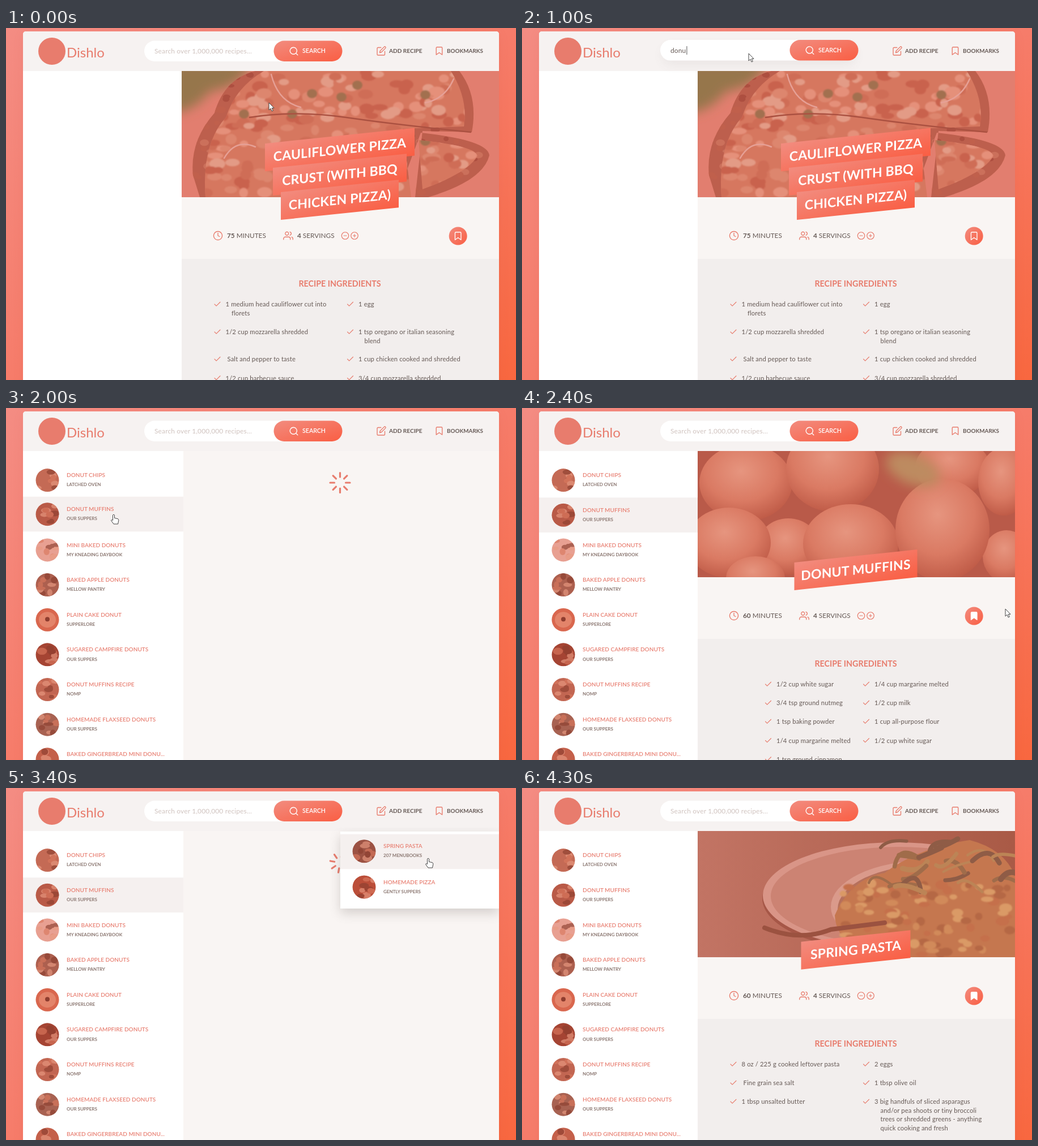
Animation of 900x622 px, one loop 4.6 s. Source, as an HTML page:

```html
<!DOCTYPE html>
<html lang="en">
<head>
<meta charset="utf-8">
<title>Recipe search</title>
<style>
  html, body { margin: 0; width: 100%; height: 100%; overflow: hidden; }
  svg#stage { display: block; width: 100%; height: 100%; font-family: Lato, "Open Sans", sans-serif; }
  text { white-space: pre; }
</style>
</head>
<body>
<svg id="stage" viewBox="0 0 900 622">
  <defs>
    <linearGradient id="page" x1="0" y1="0" x2="1" y2="1">
      <stop stop-color="#f48c83"/><stop offset=".5" stop-color="#f67c6a"/><stop offset="1" stop-color="#f8673f"/>
    </linearGradient>
    <linearGradient id="coral" x1="0" y1="0" x2="1" y2="1">
      <stop stop-color="#f28c7f"/><stop offset="1" stop-color="#fa5e43"/>
    </linearGradient>
    <linearGradient id="wood"><stop stop-color="#c27464"/><stop offset="1" stop-color="#a95a46"/></linearGradient>
    <radialGradient id="ball" cx=".45" cy=".35" r=".65">
      <stop stop-color="#e6957f"/><stop offset=".6" stop-color="#da7a63"/><stop offset="1" stop-color="#c05c48"/>
    </radialGradient>
    <filter id="soft" x="-50%" y="-50%" width="200%" height="200%"><feGaussianBlur stdDeviation="10"/></filter>
    <filter id="slight"><feGaussianBlur stdDeviation="1.2"/></filter>
    <clipPath id="disc"><circle r="20.5"/></clipPath>
  </defs>
</svg>
<script>
const stage = document.getElementById('stage');
const CORAL = '#e87c6d', DARK = '#655955', PALE = '#f9f5f3', GREY = '#f2eeed';

let seed = 7;
const random = (low = 0, high = 1) => {
  seed = (seed * 16807) % 2147483647;
  return low + (high - low) * seed / 2147483647;
};

const rect = (x, y, w, h, fill, extra = '') =>
  `<rect x="${x}" y="${y}" width="${w}" height="${h}" fill="${fill}" ${extra}/>`;
const oval = (x, y, rx, ry, fill, extra = '') =>
  `<ellipse cx="${x}" cy="${y}" rx="${rx}" ry="${ry}" fill="${fill}" ${extra}/>`;
const path = (d, fill, extra = '') => `<path d="${d}" fill="${fill}" ${extra}/>`;
const line = (d, color, width) => path(d, 'none', `stroke="${color}" stroke-width="${width}" stroke-linecap="round"`);
const group = (id, content, extra = '') => `<g id="${id}" ${extra}>${content}</g>`;
// y is the middle of the capitals
const text = (x, y, content, size, fill, extra = '') =>
  `<text x="${x}" y="${y + size * .36}" font-size="${size}" fill="${fill}" ${extra}>${content}</text>`;

const ICONS = {
  search: 'M11 3a8 8 0 1 0 .01 0zM21 21l-4.3-4.3',
  edit: 'M11 4H4a2 2 0 0 0-2 2v14a2 2 0 0 0 2 2h14a2 2 0 0 0 2-2v-7M18.5 2.5a2.1 2.1 0 0 1 3 3L12 15l-4 1 1-4z',
  bookmark: 'M19 21l-7-5-7 5V5a2 2 0 0 1 2-2h10a2 2 0 0 1 2 2z',
  clock: 'M12 2a10 10 0 1 0 .01 0zM12 6v6l4 2',
  users: 'M17 21v-2a4 4 0 0 0-4-4H5a4 4 0 0 0-4 4v2M9 3a4 4 0 1 0 .01 0zM23 21v-2a4 4 0 0 0-3-3.9M16 3.1a4 4 0 0 1 0 7.8',
  minus: 'M12 2a10 10 0 1 0 .01 0zM8 12h8',
  plus: 'M12 2a10 10 0 1 0 .01 0zM8 12h8M12 8v8',
  check: 'M20 6L9 17l-5-5',
};
const icon = (name, x, y, size, color = CORAL, extra = '') =>
  `<path d="${ICONS[name]}" transform="translate(${x - size / 2} ${y - size / 2}) scale(${size / 24})" fill="none"
    stroke="${color}" stroke-width="1.8" stroke-linecap="round" stroke-linejoin="round" ${extra}/>`;

// Photographs
const scatter = (count, [x1, x2], [y1, y2], colors, size) => Array.from({ length: count }, (_, i) =>
  oval(random(x1, x2), random(y1, y2), random(size / 2, size), random(size / 3, size * .7), colors[i % colors.length])).join('');

const CRUST = 'M440 76Q385 90 368 150Q324 200 330 260L342 299H722L735 182L822 184Q834 120 800 76Z' +
  'M732 185Q850 198 853 225Q842 270 745 299H690Z';
const TOPPING = 'M455 76Q405 105 388 158Q345 205 352 299H715L700 178L808 174Q816 125 785 76Z' +
  'M728 198Q828 208 832 226Q815 256 735 285Z';
const CHEESE = ['#e39b86', '#c9624d', '#dd866e', '#cf6d56', '#e5907a'];

const pizza = () =>
  `<clipPath id="crust">${path(CRUST, '#000')}</clipPath><clipPath id="topping">${path(TOPPING, '#000')}</clipPath>` +
  rect(310, 76, 560, 223, '#e27e6f') +
  path('M290 60H435Q415 105 360 112Q330 150 290 150Z', '#96764c', 'filter="url(#soft)"') +
  path(CRUST, '#bd5f4d') +
  `<g clip-path="url(#crust)">${scatter(150, [325, 855], [76, 299], ['#ad4f40', '#cb705b', '#c0604c'], 9)}</g>` +
  path(TOPPING, '#d6775f') +
  `<g clip-path="url(#topping)"><g filter="url(#slight)">${scatter(230, [350, 832], [78, 299], CHEESE, 14)}` +
  [[540, 116], [620, 101], [740, 118], [505, 152], [592, 122], [740, 200], [420, 152]]
    .map(([x, y]) => oval(x, y, 9, 8, '#a27050')).join('') + '</g></g>' +
  line('M430 158Q510 145 600 158T820 184', '#ab5141', 2.5) +
  line('M468 82Q480 130 520 140M790 90Q775 125 740 132M385 230Q405 195 440 210', '#e6a096', 2.5);

const muffins = () =>
  rect(310, 76, 560, 223, '#b95a49') +
  [[760, 105, 66, 50], [850, 130, 45, 60], [470, 245, 55, 50], [395, 132, 82, 68], [365, 238, 74, 62], [548, 108, 82, 75],
   [580, 240, 84, 70], [855, 262, 42, 46], [742, 215, 83, 90], [412, 300, 52, 38]]
    .map(([x, y, rx, ry]) => oval(x, y, rx, ry, 'url(#ball)')).join('') +
  oval(690, 108, 50, 27, '#bd8b60', 'transform="rotate(22 690 108)" filter="url(#soft)"');

const pasta = () =>
  rect(310, 76, 560, 223, 'url(#wood)') +
  oval(660, 195, 236, 96, '#a65747') + oval(660, 190, 235, 94, '#d99587') + oval(665, 191, 226, 87, '#cc8373') +
  oval(715, 210, 170, 82, '#da9a8b') + oval(720, 214, 163, 78, '#b6705c') +
  path('M552 225Q580 160 640 150Q700 105 790 92Q860 110 875 170V300H660Q555 290 552 225Z', '#c5774f') +
  `<g filter="url(#slight)">${scatter(90, [565, 865], [165, 295], ['#da9a66', '#c5704b', '#d18a5a', '#b56845'], 12)}</g>` +
  Array.from({ length: 22 }, (_, i) => {
    const x = random(610, 850), y = random(105, 185);
    return line(`M${x} ${y}q${random(5, 30)} ${random(-40, 10)} ${random(30, 60)} ${random(-25, 20)}`,
      ['#8f5c46', '#bc8456', '#a06c4a'][i % 3], random(4, 10));
  }).join('') +
  line('M428 247Q490 272 545 250L640 238', '#9b5240', 8);

const thumbnail = (x, y, color) =>
  `<g transform="translate(${x} ${y})" clip-path="url(#disc)">${oval(0, 0, 21, 21, color)}` +
  `<g opacity=".65">${scatter(9, [-16, 16], [-16, 16], ['#e99a82', '#8d4031', '#d9785f'], 9)}</g></g>`;

const donutThumbnail = (x, y) =>
  oval(x, y, 20.5, 20.5, '#d9674e') + oval(x, y, 15, 14, '#e3846a') + oval(x, y - 1, 4, 4, '#8f3d2f');

// Recipe lists
const entry = (x, y, [title, publisher, color]) =>
  (color ? thumbnail(x, y, color) : donutThumbnail(x, y)) +
  text(x + 34, y - 9, title, 10, '#e88073', 'font-weight="600" letter-spacing=".04"') +
  text(x + 34, y + 7.8, publisher, 8, '#8a7670', 'font-weight="700"');

const RESULTS = [
  ['DONUT CHIPS', 'LATCHED OVEN', '#c46a55'],
  ['DONUT MUFFINS', 'OUR SUPPERS', '#b95a47'],
  ['MINI BAKED DONUTS', 'MY KNEADING DAYBOOK', '#e8a092'],
  ['BAKED APPLE DONUTS', 'MELLOW PANTRY', '#ad604f'],
  ['PLAIN CAKE DONUT', 'SUPPERLORE', ''],
  ['SUGARED CAMPFIRE DONUTS', 'OUR SUPPERS', '#a54433'],
  ['DONUT MUFFINS RECIPE', 'NOMP', '#c26652'],
  ['HOMEMADE FLAXSEED DONUTS', 'OUR SUPPERS', '#a86252'],
  ['BAKED GINGERBREAD MINI DONU...', 'OUR SUPPERS', '#c4604a'],
];
const ROW = 61.65;
const results = () => RESULTS.map((item, i) => {
  const y = 127.6 + ROW * i;
  return i === 1
    ? group('chosen', rect(30, y - 31, 283, ROW, '#f5f0ef', 'id="highlight"') + entry(73, y, item))
    : entry(73, y, item);
}).join('');

const bookmarks = () =>
  rect(590, 85, 280, 136, '#615551', 'opacity=".24" filter="url(#soft)"') +
  rect(590, 77, 280, 136, '#fff') +
  group('pick', rect(590, 83.2, 280, ROW, '#f5f0ef', 'id="pickShade"') +
    entry(632, 113.4, ['SPRING PASTA', '207 MENUBOOKS', '#9c5243'])) +
  entry(632, 175, ['HOMEMADE PIZZA', 'GENTLY SUPPERS', '#bb4e39']);

// Recipe page
const titleLine = ([label, width], i, all) => {
  const y = 286 + (all.length > 1 ? 17.6 : 0) - 44.4 * (all.length - 1 - i);
  return `<g transform="translate(589 ${y}) skewY(-6)">${rect(-width / 2, -24.5, width, 49, 'url(#coral)')}` +
    text(0, 0, label, 23, '#fff', 'font-weight="700" text-anchor="middle" letter-spacing=".15"') + '</g>';
};
const ingredients = ([x, items]) => items.map(([y, ...lines]) =>
  icon('check', x, y, 15) + lines.map((words, i) =>
    text(x + (i ? 25 : 14.5), y + 15.6 * i, words, 11.2, DARK, 'letter-spacing=".15"')).join('')).join('');

const recipe = (id, photo, title, minutes, saved, columns) => group(id,
  rect(310, 299, 560, 109, PALE) + rect(310, 408, 560, 214, GREY) +
  `<svg x="310" y="76" width="560" height="223" viewBox="310 76 560 223">${photo}</svg>` +
  title.map(titleLine).join('') +
  icon('clock', 374, 367, 18) + icon('users', 498, 367, 18) + icon('minus', 598.5, 367, 15) + icon('plus', 615, 367, 15) +
  [[390, minutes, 'MINUTES'], [514, 4, 'SERVINGS']].map(([x, count, unit]) =>
    text(x, 367, `<tspan font-weight="700">${count}</tspan> ${unit}`, 11.8, DARK)).join('') +
  oval(797.7, 367.5, 16, 16, 'url(#coral)') +
  icon('bookmark', 797.7, 367.5, 18, '#fff', `class="mark" ${saved ? 'style="fill:#fff"' : ''}`) +
  text(589, 451.5, 'RECIPE INGREDIENTS', 14.3, CORAL, 'font-weight="700" text-anchor="middle"') +
  columns.map(ingredients).join(''));

const recipes = () =>
  recipe('pizza', pizza(), [['CAULIFLOWER PIZZA', 264], ['CRUST (WITH BBQ', 236], ['CHICKEN PIZZA)', 208]], 75, false, [
    [373, [[488, '1 medium head cauliflower cut into', 'florets'], [537, '1/2 cup mozzarella shredded'],
      [585, ' Salt and pepper to taste'], [618.5, '1/2 cup barbecue sauce']]],
    [607.5, [[488, '1 egg'], [537, '1 tsp oregano or italian seasoning', 'blend'],
      [585, '1 cup chicken cooked and shredded'], [618.5, '3/4 cup mozzarella shredded']]]]) +
  recipe('muffins', muffins(), [['DONUT MUFFINS', 217]], 60, false, [
    [434.5, [[488, '1/2 cup white sugar'], [521, '3/4 tsp ground nutmeg'], [554, '1 tsp baking powder'],
      [587.5, '1/4 cup margarine melted'], [620.5, '1 tsp ground cinnamon']]],
    [607.5, [[488, '1/4 cup margarine melted'], [521, '1/2 cup milk'], [554, '1 cup all-purpose flour'],
      [587.5, '1/2 cup white sugar']]]]) +
  recipe('pasta', pasta(), [['SPRING PASTA', 193]], 60, true, [
    [373, [[488, '8 oz / 225 g cooked leftover pasta'], [521, ' Fine grain sea salt'], [554, '1 tbsp unsalted butter']]],
    [607.5, [[488, '2 eggs'], [521, '1 tbsp olive oil'], [554, '3 big handfuls of sliced asparagus',
      'and/or pea shoots or tiny broccoli', 'trees or shredded greens - anything', 'quick cooking and fresh']]]]);

const header = () =>
  rect(30, 6, 840, 70, '#f6f2f1', 'rx="5"') + rect(30, 40, 840, 36, '#f6f2f1') +
  oval(81, 41, 24, 24, CORAL) + text(107, 43, 'Dishlo', 24, CORAL) +
  group('form',
    rect(248, 34, 340, 32, '#615551', 'rx="16" opacity=".08" filter="url(#soft)" id="formShade"') +
    rect(244, 22.5, 349, 36.5, '#fff', 'rx="18.2"') +
    text(262, 41, 'Search over 1,000,000 recipes...', 11.9, '#d0c3bf', 'letter-spacing=".18" id="hint"') +
    text(262, 41, '', 11.9, DARK, 'letter-spacing=".18" id="query"') +
    rect(262, 33.5, 1, 15, '#555', 'id="caret"') +
    group('button', rect(472.5, 22.5, 121, 36.5, 'url(#coral)', 'rx="18.2"') +
      icon('search', 508, 41, 18, '#fff') + text(523, 40.5, 'SEARCH', 10.6, '#fff', 'font-weight="600"'))) +
  icon('edit', 662.5, 40.5, 18) + text(676, 40.5, 'ADD RECIPE', 10.1, DARK, 'font-weight="700"') +
  icon('bookmark', 764.5, 40.5, 18) + text(778, 40.5, 'BOOKMARKS', 9.9, DARK, 'font-weight="700"');

const spokes = Array.from({ length: 8 }, (_, i) =>
  `<path d="M0-10V-17.5" stroke="${CORAL}" stroke-width="3.2" stroke-linecap="round" transform="rotate(${i * 45})"/>`).join('');

const outline = 'stroke="#444" stroke-width="1" stroke-linejoin="round"';
const pointers =
  group('arrow', path('M0 0V13L3 10.2L5.2 15L7.3 14L5.2 9.4H9Z', '#fff', outline)) +
  group('hand', path('M-1.5 1.2Q0-.8 1.5 1.2V6.5L7 7.6Q9 8.2 8.8 10.5L7.5 17H0L-4.5 10.8Q-4.5 8.6-1.5 10.4Z', '#fff', outline));

stage.insertAdjacentHTML('beforeend',
  rect(0, 0, 900, 622, 'url(#page)') +
  rect(30, 10, 840, 640, '#a33a2a', 'opacity=".08" filter="url(#soft)"') +
  rect(30, 6, 840, 640, PALE, 'rx="5"') + rect(30, 76, 283, 546, '#fff') +
  group('results', results()) + recipes() + header() + group('spinner', spokes) +
  `<svg x="560" y="70" width="310" height="200" viewBox="560 70 310 200">${group('bookmarks', bookmarks())}</svg>` + pointers);

const el = Object.fromEntries([...stage.querySelectorAll('[id]')].map(node => [node.id, node]));
const show = (node, visible) => node.style.display = visible ? '' : 'none';
const move = (node, x, y, more = '') => node.setAttribute('transform', `translate(${x} ${y}) ${more}`);
const clamp = value => Math.min(1, Math.max(0, value));
const between = (t, start, end) => t >= start && t < end;

// Time, x, y and the pointer shown from then on
const TRAVEL = [
  [0, 464, 132, 'arrow'], [100, 464, 132, 'arrow'], [500, 300, 42, ''], [1000, 400, 45, 'arrow'],
  [1200, 538, 50, 'hand'], [1500, 538, 50, 'arrow'], [1800, 190, 188, 'hand'], [2100, 190, 188, 'arrow'],
  [2300, 798, 364, 'hand'], [2400, 853, 355, 'arrow'], [2500, 853, 355, 'arrow'], [2800, 800, 38, 'hand'],
  [3000, 800, 38, 'hand'], [3200, 745, 124, 'hand'], [3600, 745, 124, 'arrow'], [4000, 890, 630, ''], [4600, 890, 630, ''],
];
const SPINNERS = [
  { start: 1300, end: 1500, x: 170, y: 153, angle: -10 },
  { start: 1900, end: 2100, x: 589.5, y: 132, angle: -18 },
  { start: 3300, end: 3600, x: 589.5, y: 132, angle: -8 },
];

function render(t) {
  show(el.results, t >= 1500);
  show(el.pizza, t < 1900);
  show(el.muffins, between(t, 2100, 3300));
  show(el.pasta, t >= 3600);
  el.muffins.querySelector('.mark').style.fill = t >= 2300 ? '#fff' : 'none';

  const raised = between(t, 500, 1700);
  move(el.form, 0, raised ? -1.4 : 0);
  show(el.formShade, raised);
  const query = between(t, 600, 1300) ? 'donut'.slice(0, (t - 600) / 100) : '';
  el.query.textContent = query;
  show(el.hint, !query);
  show(el.caret, between(t, 600, 1200));
  move(el.caret, query ? el.query.getComputedTextLength() + 1 : 0, 0);
  move(el.button, 533, 40.7, `scale(${between(t, 1200, 1600) ? 1.05 : 1}) translate(-533 -40.7)`);

  show(el.highlight, between(t, 1800, 3600));
  move(el.chosen, 0, between(t, 1800, 2200) ? -1.6 : 0);

  const opacity = clamp((t - 2700) / 200) * clamp((4000 - t) / 200);
  el.bookmarks.style.opacity = opacity;
  show(el.bookmarks, opacity > 0);
  const picking = between(t, 3100, 3700);
  show(el.pickShade, picking);
  move(el.pick, 0, picking ? -1.6 : 0);

  const spin = SPINNERS.find(({ start, end }) => between(t, start, end));
  show(el.spinner, spin);
  if (spin) move(el.spinner, spin.x, spin.y, `rotate(${spin.angle + (t - spin.start) * .18})`);

  const i = TRAVEL.findLastIndex(([time]) => time <= t);
  const [t0, x0, y0, kind] = TRAVEL[i], [t1, x1, y1] = TRAVEL[i + 1];
  const p = (t - t0) / (t1 - t0), eased = p * p * (3 - 2 * p);
  for (const name of ['arrow', 'hand']) {
    show(el[name], kind === name);
    move(el[name], x0 + (x1 - x0) * eased, y0 + (y1 - y0) * eased);
  }
}

const begin = performance.now();
function tick() {
  const step = Math.floor((performance.now() - begin) % 4600 / 100);
  render(Math.min(step, 43) * 100);
  requestAnimationFrame(tick);
}
tick();
</script>
</body>
</html>
```
